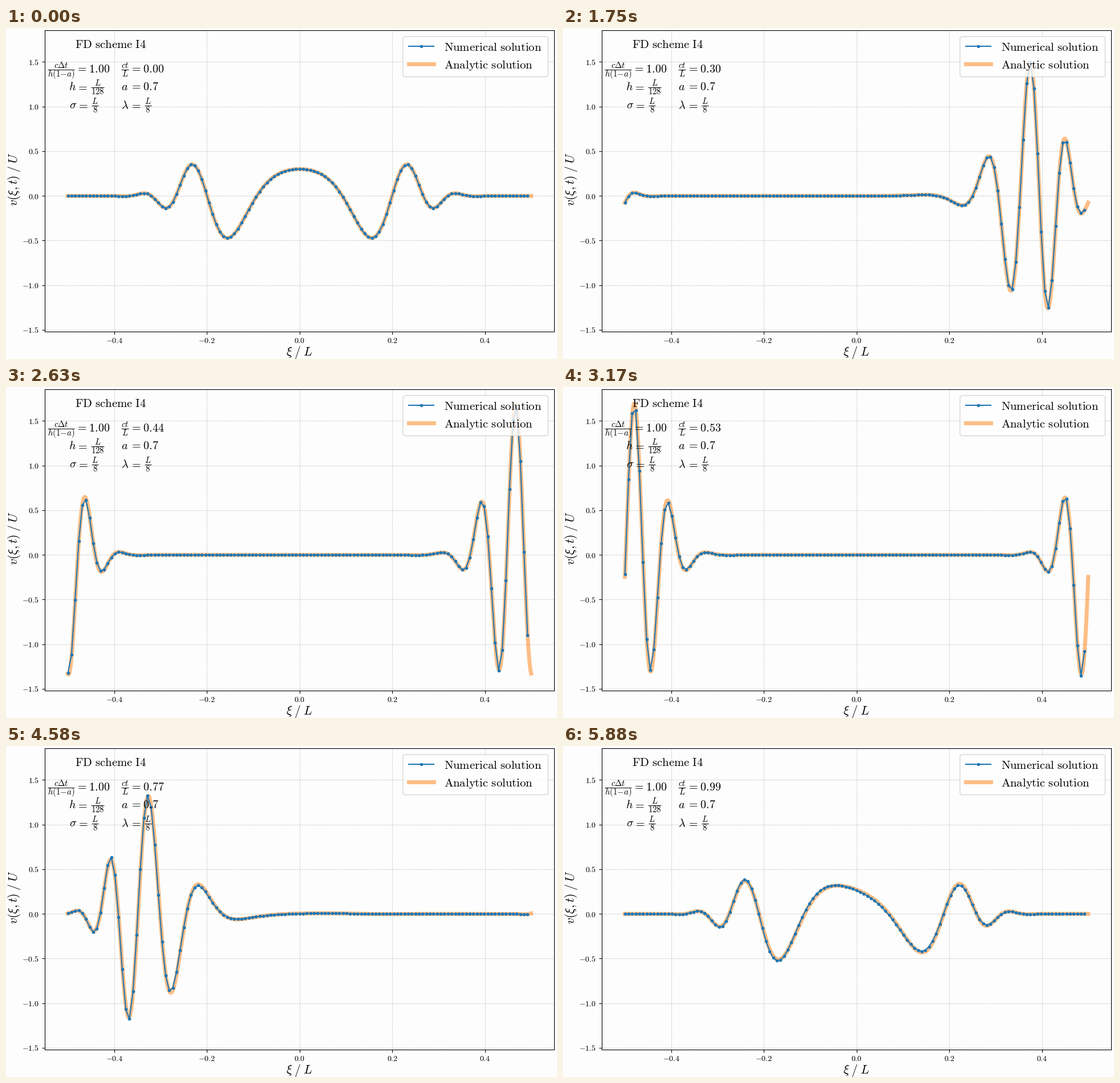
These frames come from a looping animation (966x580 px, 5.93 s). A matplotlib script:

```python
import numpy as np
import matplotlib.pyplot as plt
from matplotlib.animation import FuncAnimation
from matplotlib.patches import FancyBboxPatch

W, H, DPI = 966, 580, 100
LOOP_MS, TICKS = 5930, 297
POSES, FPS = 142, 24
STEPS_PER_POSE = 3
N, A = 128, 0.7
SIGMA = LAMBDA = 1 / 8
SPACING = 1 / N
DT = SPACING * (1 - A)
PAPER, BLUE, ORANGE = "#fdfdfd", "#1f77b4", "#ff7f0e"

plt.rcParams["mathtext.fontset"] = "cm"


def stretch(xi):
    """Physical position of a computational coordinate."""
    return xi - A / (2 * np.pi) * np.sin(2 * np.pi * xi)


def jacobian(xi):
    return 1 - A * np.cos(2 * np.pi * xi)


def exact(xi, t):
    d = (stretch(xi) - t + 0.5) % 1 - 0.5
    return jacobian(xi) * np.exp(-(d / SIGMA) ** 2) * np.cos(2 * np.pi * d / LAMBDA)


nodes = -0.5 + SPACING * np.arange(N)
fine = np.linspace(-0.5, 0.5, 1001)

# Fourier symbol of the fourth-order compact derivative
theta = 2 * np.pi * np.fft.rfftfreq(N)
symbol = 3j * np.sin(theta) / (SPACING * (2 + np.cos(theta)))
metric = jacobian(nodes)


def rate(v):
    return -np.fft.irfft(symbol * np.fft.rfft(v / metric), N)


def rk4(v):
    k1 = rate(v)
    k2 = rate(v + DT / 2 * k1)
    k3 = rate(v + DT / 2 * k2)
    k4 = rate(v + DT * k3)
    return v + DT / 6 * (k1 + 2 * k2 + 2 * k3 + k4)


def solve():
    v = exact(nodes, 0)
    history = [v]
    for _ in range(POSES - 1):
        for _ in range(STEPS_PER_POSE):
            v = rk4(v)
        history.append(v)
    return history


history = solve()

# Pose starts at 24 fps, rounded to 10 ms; each tick shows the latest begun
starts = 10 * np.floor(np.arange(POSES) * 100 / FPS + 0.5)
tick_ends = np.arange(1, TICKS + 1) * LOOP_MS / TICKS
poses = np.searchsorted(starts, tick_ends) - 1

fig = plt.figure(figsize=(W / DPI, H / DPI), dpi=DPI, facecolor=PAPER)

# Plot area
left, right, top, bottom = 67.9, 961.4, 3.6, 531.5
ax = fig.add_axes([left / W, 1 - bottom / H, (right - left) / W, (bottom - top) / H],
                  facecolor=PAPER)
ax.set(xlim=(-0.55, 0.55), ylim=(-1.516, 1.8566))
xticks = np.arange(-2, 3) * 0.2
yticks = np.arange(-3, 4) * 0.5
ax.set_xticks(xticks, [f"${x:.1f}$" for x in xticks])
ax.set_yticks(yticks, [f"${y:.1f}$" for y in yticks])
ax.grid(ls=":")
numeric, = ax.plot(nodes, history[0], ".-", color=BLUE, zorder=2.2)
analytic, = ax.plot(fine, exact(fine, 0), color=ORANGE, lw=5, alpha=0.5, zorder=2.1)

# Overlay in pixel coordinates
over = fig.add_axes([0, 0, 1, 1], facecolor="none")
over.set(xlim=(0, W), ylim=(H, 0))
over.axis("off")


def label(x, y, tex, size=14.4, **kw):
    return over.text(x, y, f"${tex}$", size=size, va="baseline", **kw)


def roman(s):
    return r"\mathrm{" + s.replace(" ", r"\ ") + "}"


def equals(value=""):
    return r"=\hspace{0.08}" + value


def fraction(x, y, num, den):
    """Inline fraction centred on x, for text with baseline y."""
    parts = [label(x, y - 7.9, num, 10.7, ha="center"),
             label(x, y + 6.9, den, 10.7, ha="center")]
    half = max(p.get_window_extent().width for p in parts) / 2
    over.plot([x - half, x + half], [y - 5, y - 5], "k", lw=0.7,
              solid_capstyle="butt")


label(514.5, 574.5, r"\xi\;/\;L", 15.6, ha="center")
label(20.5, 265, r"v(\xi,t)\;/\;U", 15.6, rotation=90,
      rotation_mode="anchor", ha="center")

row1, row2, row3 = 78, 109.3, 141
label(183, 35, roman("FD scheme I4"), 14.9, ha="center")
fraction(96.7, row1, r"c\Delta t", "h(1{-}a)")
label(122, row1, equals("1.00"))
fraction(208.7, row1, "ct", "L")
clock = label(217, row1, equals("0.00"))
label(110.5, row2, "h")
label(123, row2, equals())
fraction(160.5, row2, "L", "128")
label(202, row2, "a")
label(217, row2, equals("0.7"))
label(111, row3, r"\sigma")
label(123.5, row3, equals())
fraction(156, row3, "L", "8")
label(202, row3, r"\lambda")
label(217, row3, equals())
fraction(248.7, row3, "L", "8")

# Legend
over.add_patch(FancyBboxPatch((696, 15), 254.5, 70.5,
                              boxstyle="round,pad=0,rounding_size=4.4",
                              fc="white", ec="0.8", lw=1, alpha=0.8, zorder=1))
over.plot([706, 728.2, 750.4], [32] * 3, color=BLUE, zorder=2)
over.plot(728.2, 32, ".", color=BLUE, zorder=2)
over.plot([706, 750.4], [63] * 2, color=ORANGE, lw=5, alpha=0.5, zorder=2)
label(768, 40, roman("Numerical solution"), 14.9)
label(768, 71, roman("Analytic solution"), 14.9)


def update(tick):
    pose = poses[tick]
    t = pose * STEPS_PER_POSE * DT
    numeric.set_ydata(history[pose])
    analytic.set_ydata(exact(fine, t))
    clock.set_text(f"${equals(f'{t:.2f}')}$")
    return numeric, analytic, clock


anim = FuncAnimation(fig, update, frames=TICKS, interval=LOOP_MS / TICKS,
                     repeat=True, repeat_delay=0)
plt.show()
```
